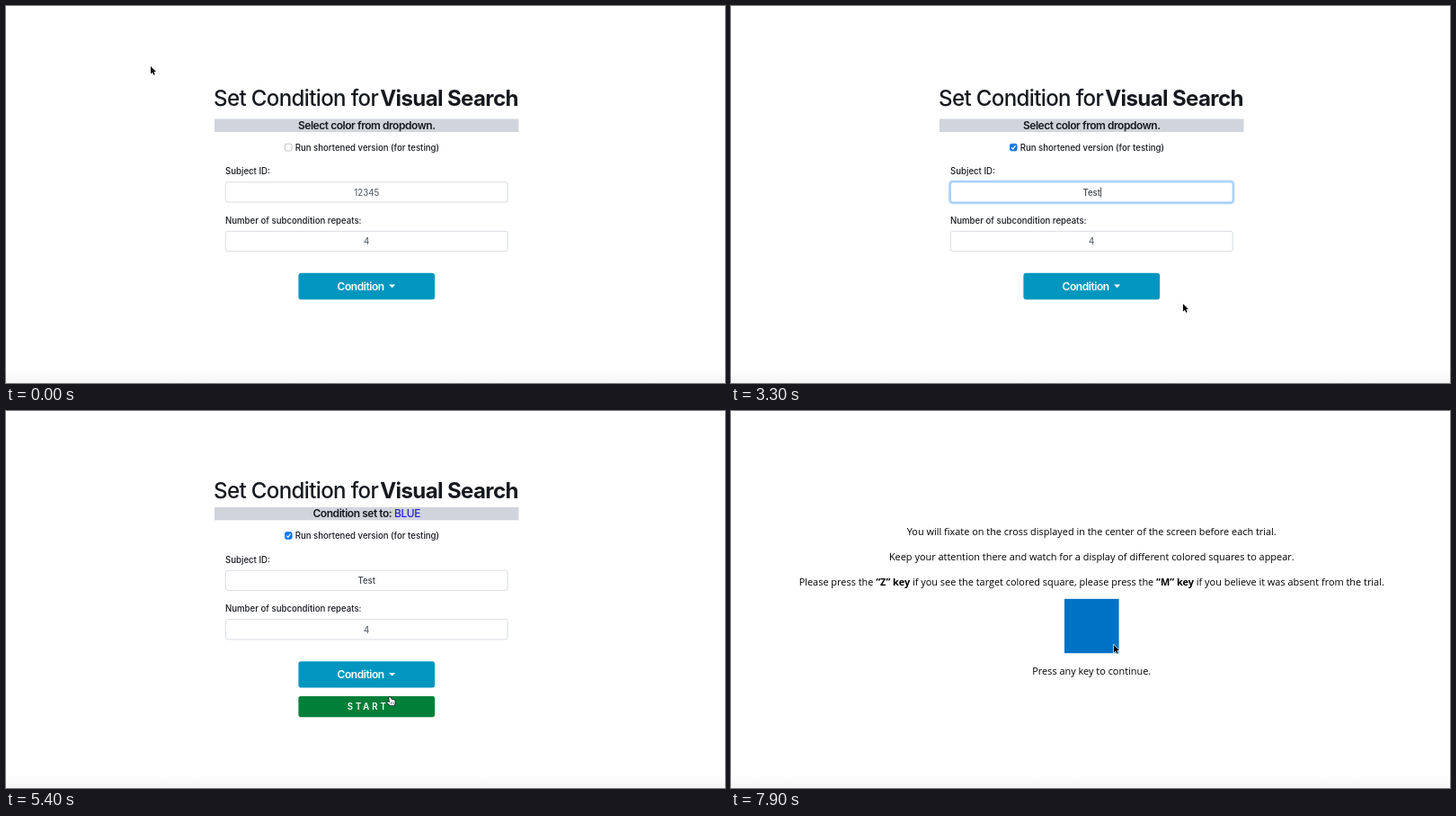
An HTML page with a canvas that plays this animation: 800x419 px, repeating every 8 s.

```html
<!DOCTYPE html>
<html lang="en">
<head>
<meta charset="utf-8">
<title>Visual Search</title>
<style>
  html, body { margin: 0; width: 100%; height: 100%; overflow: hidden; background: #fff; }
  canvas { display: block; width: 800px; height: 419px; }
</style>
</head>
<body>
<canvas id="stage"></canvas>
<script>
const W = 800, H = 419, LOOP = 8000, STEP = 100, MID = 401.25;
const canvas = document.getElementById('stage');
const ctx = canvas.getContext('2d');
const dpr = window.devicePixelRatio || 1;
canvas.width = W * dpr;
canvas.height = H * dpr;

const UI = 'Inter, Roboto, sans-serif';
const SANS = '"Open Sans", "Noto Sans", sans-serif';
const INK = '#16191f', BORDER = '#ced4da';
const BODY = 9.63, NOTE = 10.93;

// Moments of the story, in ms
const T = { check: 1100, focus: 2200, type: 2500, open: 4000, choose: 4800, welcome: 5800, guide: 7300 };

// Pointer stops: time, x, y
const PATH = [
  [0, 161, 67], [200, 161, 67], [900, 314, 156], [1300, 314, 156],
  [1900, 430, 219], [2200, 428, 206], [2800, 428, 206], [3300, 503, 331],
  [3600, 503, 331], [4000, 428, 313], [4200, 428, 313], [4400, 427, 329],
  [4600, 427, 341], [4900, 427, 341], [5200, 428, 318], [5800, 428, 318],
  [6200, 427, 325], [6400, 427, 325], [6700, 426, 260], [8000, 426, 260]
];

// Pointer shape from each time on
const SHAPES = [
  [0, 'arrow'], [2000, 'beam'], [2500, 'none'], [2800, 'beam'], [2900, 'arrow'],
  [3900, 'hand'], [4400, 'arrow'], [4600, 'hand'], [4800, 'arrow'], [5000, 'hand'], [6500, 'arrow']
];

function text(str, x, y, size, o = {}) {
  ctx.font = `${o.weight || 450} ${size}px ${o.family || UI}`;
  ctx.letterSpacing = (o.track || 0) + 'px';
  ctx.textAlign = o.align || 'left';
  ctx.fillStyle = o.color || INK;
  ctx.fillText(str, x, y);
}

// Centred Open Sans line; *stars* mark bold runs
function rich(str, y, size) {
  const runs = str.split('*').map((s, i) => ({ s, font: `${i % 2 ? 700 : 400} ${size}px ${SANS}` }));
  ctx.letterSpacing = '0px';
  ctx.textAlign = 'left';
  ctx.fillStyle = '#000';
  let total = 0;
  for (const r of runs) {
    ctx.font = r.font;
    total += r.w = ctx.measureText(r.s).width;
  }
  let x = MID - total / 2;
  for (const r of runs) {
    ctx.font = r.font;
    ctx.fillText(r.s, x, y);
    x += r.w;
  }
}

function box(x, y, w, h, r, fill, stroke, line = 0.8) {
  ctx.beginPath();
  ctx.roundRect(x, y, w, h, r);
  if (fill) { ctx.fillStyle = fill; ctx.fill(); }
  if (stroke) { ctx.strokeStyle = stroke; ctx.lineWidth = line; ctx.stroke(); }
}

function shape(points, fill, stroke, line) {
  ctx.beginPath();
  points.forEach(([x, y]) => ctx.lineTo(x, y));
  ctx.closePath();
  if (stroke) { ctx.strokeStyle = stroke; ctx.lineWidth = line; ctx.stroke(); }
  ctx.fillStyle = fill;
  ctx.fill();
}

function field(y, value, color, focused) {
  if (focused) box(243.2, y - 0.8, 316.1, 24.6, 3.4, null, 'rgba(0,123,255,.3)', 2.2);
  box(244.4, y + 0.4, 313.8, 22.2, 2.4, '#fff', focused ? '#80bdff' : BORDER);
  text(value, MID, y + 15.2, BODY, { align: 'center', color });
}

function checkbox(x, y, on) {
  box(x + 0.4, y + 0.4, 7.8, 7.8, 1.8, on ? '#1277ea' : '#fff', on ? '#1277ea' : '#a9a9a9', 0.7);
  if (!on) return;
  ctx.beginPath();
  ctx.moveTo(x + 2.2, y + 4.4);
  ctx.lineTo(x + 3.8, y + 6.2);
  ctx.lineTo(x + 6.5, y + 2.3);
  ctx.strokeStyle = '#fff';
  ctx.lineWidth = 1.2;
  ctx.stroke();
}

function menu(t) {
  box(325.9, 327.4, 150.6, 88, 2.4, '#fff', 'rgba(0,0,0,.16)');
  if (t >= 4600) {
    ctx.fillStyle = '#f3f4f5';
    ctx.fillRect(326.4, 333, 149.7, 19.2);
  }
  ['Blue', 'Red', 'Green', 'Yellow'].forEach((name, i) =>
    text(name, MID, 346 + i * 19.3, BODY, { align: 'center' }));
}

function form(t) {
  const chosen = t >= T.choose;
  const open = t >= T.open && !chosen;
  const focused = t >= T.focus && t < T.open;
  const typed = 'Test'.slice(0, Math.max(0, Math.floor((t - T.type) / 150) + 1));
  const head = { track: -0.65 }, sub = { weight: 600, track: -0.45 };

  const top = chosen ? 96.6 : 110.6;
  text('Set Condition for', 231, top, 24.1, head);
  text('Visual Search', 569.8, top, 24.1, { ...head, weight: 700, align: 'right' });

  ctx.save();
  if (chosen) ctx.translate(0, -18.6);
  ctx.fillStyle = '#d0d5dd';
  ctx.fillRect(232, 125.5, 338.5, 14.5);
  if (chosen) {
    text('Condition set to:', 429.2, 137, 12, { ...sub, align: 'right' });
    text('BLUE', 432, 137, 12, { track: -0.45, color: '#2a1fd6' });
  } else {
    text('Select color from dropdown.', MID, 137, 12, { ...sub, align: 'center' });
  }

  checkbox(310, 152.8, t >= T.check);
  text('Run shortened version (for testing)', 321.7, 160.5, BODY);
  text('Subject ID:', 244, 187.4, BODY);
  field(195.4, typed || '12345', typed ? '#3b4249' : '#5f676e', focused);
  if (focused && t % 1000 < 600) {
    const half = ctx.measureText(typed).width / 2;
    ctx.fillStyle = '#222';
    ctx.fillRect(MID + half + 0.2, 201.5, 0.8, 11);
  }
  text('Number of subcondition repeats:', 244, 241.6, BODY);
  field(249.9, '4', '#5f676e', false);

  if (open) {
    menu(t);
    box(324.7, 296.1, 153, 30.8, 3.6, null, 'rgba(0,160,205,.55)', 2.2);
  }
  box(325.4, 296.8, 151.7, 29.4, 3, open ? '#007090' : '#0096bf');
  text('Condition', 394.6, 315.8, 12, { ...sub, align: 'center', color: '#fff' });
  shape([[426, 309.6], [433.2, 309.6], [429.6, 313.2]], '#fff');
  ctx.restore();

  if (chosen) {
    box(325.4, 316.9, 151.7, 23.3, 2.4, '#007f38');
    text('START', 379.8, 332.2, BODY, { weight: 600, track: 2.9, color: '#fff' });
  }
}

function welcome() {
  box(366.5, 110.3, 69, 69, 3, '#a5dcf1');
  text('OVK', 350.5, 197.4, 17.6, { family: SANS, weight: 300, color: '#222' });
  text('SENSES', 451.5, 197.4, 17.2, { family: SANS, weight: 600, color: '#35b3dc', align: 'right' });
  text('ATTENTION', MID, 214, 18, { family: SANS, weight: 600, color: '#111', align: 'center' });
  rich('Welcome to the *Visual Search* Experiment.', 253.6, NOTE);
  rich('Press any key to begin.', 305, 29.16);
}

function guide() {
  rich('You will fixate on the cross displayed in the center of the screen before each trial.', 138.1, NOTE);
  rich('Keep your attention there and watch for a display of different colored squares to appear.', 165.9, NOTE);
  rich('Please press the *“Z” key* if you see the target colored square, please press the *“M” key* if you believe it was absent from the trial.', 193.7, NOTE);
  ctx.fillStyle = '#0072c5';
  ctx.fillRect(371, 208.8, 60.6, 60.4);
  rich('Press any key to continue.', 292.8, NOTE);
}

const ease = u => u * u * (3 - 2 * u);

function pointerAt(t) {
  const i = Math.max(1, PATH.findIndex(p => p[0] > t));
  const [t0, x0, y0] = PATH[i - 1], [t1, x1, y1] = PATH[i];
  const u = ease((t - t0) / (t1 - t0));
  return [x0 + (x1 - x0) * u, y0 + (y1 - y0) * u];
}

const draw = {
  none() {},
  arrow() {
    shape([[0, 0], [0, 8.6], [2, 6.8], [3.3, 9.8], [4.7, 9.2], [3.4, 6.3], [6, 6.1]], '#000', '#fff', 1.3);
  },
  beam() {
    ctx.beginPath();
    ctx.moveTo(-1.6, -4.6); ctx.lineTo(0, -4); ctx.lineTo(1.6, -4.6);
    ctx.moveTo(0, -4); ctx.lineTo(0, 4.6);
    ctx.moveTo(-1.6, 5.2); ctx.lineTo(0, 4.6); ctx.lineTo(1.6, 5.2);
    ctx.strokeStyle = '#222';
    ctx.lineWidth = 0.8;
    ctx.stroke();
  },
  hand() {
    ctx.lineJoin = 'round';
    shape([[-1.9, 0.5], [-0.9, 0], [0, 0.7], [1, 2.8], [3, 2.8], [4.6, 3.8], [4.8, 6.6],
           [4, 9.2], [-0.6, 9.2], [-3.8, 6.2], [-3.4, 5.2], [-2.3, 5.2], [-0.9, 6.2]], '#fff', '#111', 1.5);
    ctx.fillStyle = '#333';
    for (const x of [0.3, 1.7, 3.1]) ctx.fillRect(x, 5.4, 0.5, 2.4);
    ctx.lineJoin = 'miter';
  }
};

function pointer(t) {
  const [, kind] = SHAPES.filter(s => s[0] <= t).pop();
  ctx.save();
  ctx.translate(...pointerAt(t));
  draw[kind]();
  ctx.restore();
}

function background() {
  ctx.fillStyle = '#fff';
  ctx.fillRect(0, 0, W, H);
  const fade = ctx.createLinearGradient(0, 404, 0, H);
  fade.addColorStop(0, '#fff');
  fade.addColorStop(1, '#f6f6f6');
  ctx.fillStyle = fade;
  ctx.fillRect(0, 404, W, H - 404);
}

function render(t) {
  ctx.setTransform(dpr, 0, 0, dpr, 0, 0);
  background();
  if (t < T.welcome) form(t);
  else if (t < T.guide) welcome();
  else guide();
  pointer(t);
}

const start = performance.now();
function tick() {
  const t = (performance.now() - start) % LOOP;
  render(Math.floor(t / STEP) * STEP);
  requestAnimationFrame(tick);
}
tick();
</script>
</body>
</html>
```
